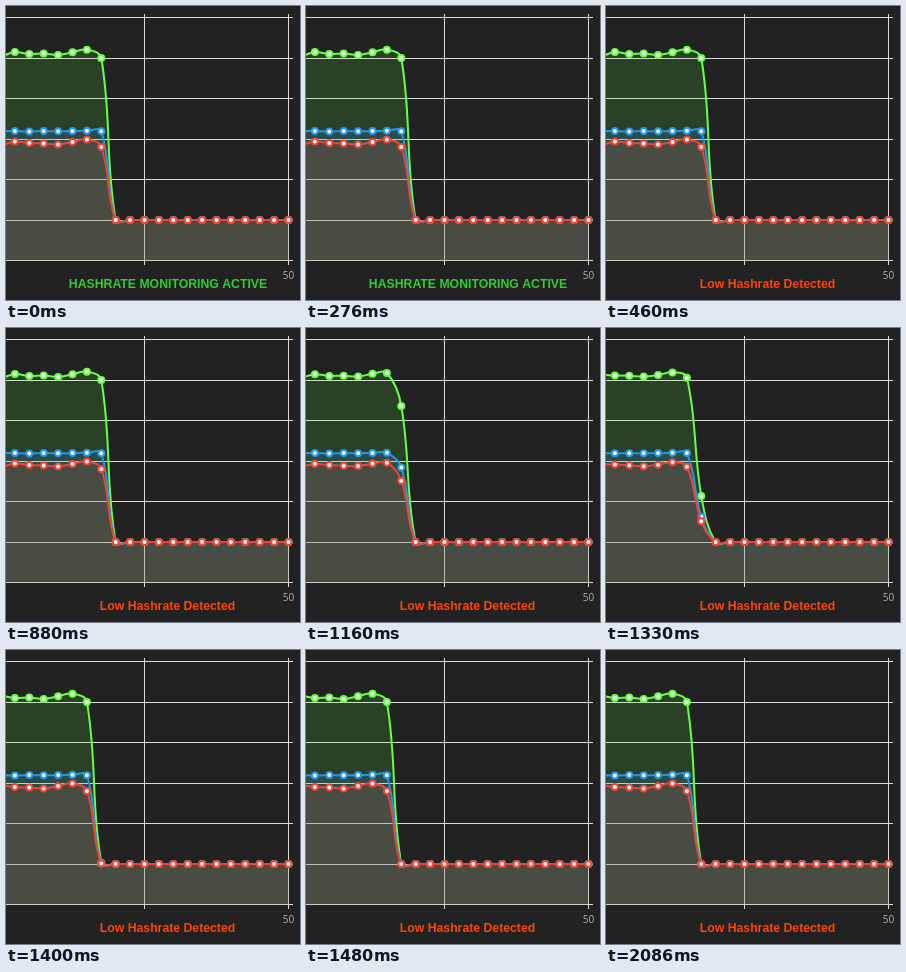
Write an HTML page with a canvas that moves like this. It is 294 by 294 pixels and loops after 2490 ms.

```html
<!DOCTYPE html>
<html>
<head>
<meta charset="utf-8">
<style>
  html, body { margin: 0; width: 100%; height: 100%; overflow: hidden; background: #222; }
  canvas { display: block; }
</style>
</head>
<body>
<canvas id="stage" width="294" height="294"></canvas>
<script>
const ctx = document.getElementById('stage').getContext('2d');
const LOOP = 2490, COUNT = 22, STEP = 14.4, RIGHT = 282.5, FLOOR = 214, BASE = 254.5, TENSION = 0.4;

// Heights of the live samples; everything after them sits on FLOOR.
const series = [
  { rgb: '102,255,68', alpha: 0.14, live: [48, 50, 46, 48, 47.5, 49, 46.2, 43.7, 52] },
  { rgb: '33,150,243', alpha: 0.15, live: [125, 125, 125, 125.5, 125, 125.3, 125, 124.8, 125.2] },
  { rgb: '244,67,54', alpha: 0.15, live: [137, 139, 135.5, 137, 137.5, 138.5, 136, 133.5, 141] }
];

// The chart shifts one sample to the left in coarse steps.
function shiftAt(t) {
  if (t < 1160) return 0;
  if (t < 1250) return 0.16;
  if (t < 1330) return 0.438;
  if (t < 1400) return 0.716;
  return t < 1480 ? 0.994 : 1;
}

function pointsOf(live, shift) {
  const value = i => i < live.length ? live[i] : FLOOR;
  return Array.from({ length: COUNT }, (_, i) => ({
    x: RIGHT - STEP * (COUNT - 1 - i),
    y: value(i) + (value(i + 1) - value(i)) * shift
  }));
}

// Control points before and after each sample.
function handles(points) {
  return points.map((p, i) => {
    const a = points[i - 1] || p, b = points[i + 1] || p;
    const before = Math.hypot(p.x - a.x, p.y - a.y);
    const after = Math.hypot(b.x - p.x, b.y - p.y);
    const k = TENSION / (before + after);
    const at = f => ({ x: p.x + f * (b.x - a.x), y: p.y + f * (b.y - a.y) });
    return { before: at(-k * before), after: at(k * after) };
  });
}

function drawSeries({ rgb, alpha, live }, shift) {
  const points = pointsOf(live, shift), ctrl = handles(points);
  const curve = new Path2D();
  curve.moveTo(points[0].x, points[0].y);
  for (let i = 1; i < COUNT; i++) {
    const a = ctrl[i - 1].after, b = ctrl[i].before, p = points[i];
    curve.bezierCurveTo(a.x, a.y, b.x, b.y, p.x, p.y);
  }
  const area = new Path2D(curve);
  area.lineTo(RIGHT, BASE);
  area.lineTo(points[0].x, BASE);
  ctx.fillStyle = `rgba(${rgb},${alpha})`;
  ctx.fill(area);

  ctx.strokeStyle = `rgb(${rgb})`;
  ctx.lineWidth = 2;
  ctx.stroke(curve);
  ctx.fillStyle = '#fff';
  for (const p of points) {
    ctx.beginPath();
    ctx.arc(p.x, p.y, 3, 0, Math.PI * 2);
    ctx.fill();
    ctx.stroke();
  }
}

function drawGrid() {
  ctx.fillStyle = '#dcdcdc';
  for (let i = 0; i < 7; i++) ctx.fillRect(0, Math.floor(11.5 + i * 40.5), 287, 1);
  ctx.fillRect(138, 8, 1, 251);
  ctx.fillRect(282, 8, 1, 251);
}

function label(text, x, y, color, font) {
  ctx.fillStyle = color;
  ctx.font = font;
  ctx.fillText(text, x, y);
}

function draw(t) {
  ctx.fillStyle = '#222';
  ctx.fillRect(0, 0, 294, 294);
  drawGrid();
  const shift = shiftAt(t);
  series.forEach(s => drawSeries(s, shift));
  ctx.textAlign = 'center';
  label('50', 282.5, 273, '#b0b0b0', '10px "Open Sans", sans-serif');
  const font = 'bold 12.25px "Liberation Sans", Arial, sans-serif';
  if (t < 460) label('HASHRATE MONITORING ACTIVE', 162, 282, '#32cd32', font);
  else label('Low Hashrate Detected', 161.5, 282, '#ff4500', font);
}

const start = performance.now();
function tick() {
  draw((performance.now() - start) % LOOP);
  requestAnimationFrame(tick);
}
tick();
</script>
</body>
</html>
```
